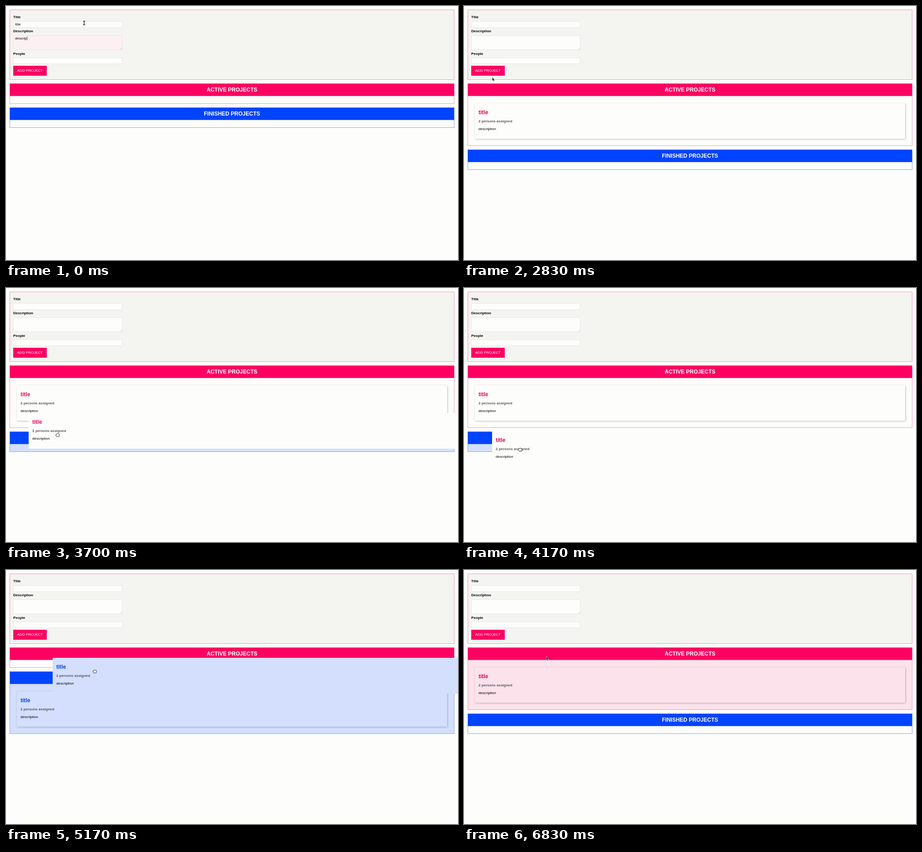
An HTML page for the animation above (7010 ms loop, 998 by 561 pixels).

```html
<!DOCTYPE html>
<html lang="en">
<head>
<meta charset="utf-8">
<title>Project board</title>
<style>
  html, body { margin: 0; width: 100%; height: 100%; overflow: hidden; background: #fdfdfb; }
  body { position: relative; font: 8px/10px "Liberation Sans", Arial, sans-serif; color: #000; }
  div, h2, h3, p, svg { position: absolute; margin: 0; white-space: pre; }

  .form { left: 8px; top: 8px; width: 982px; height: 155px; background: #f4f4f0; box-shadow: inset 0 0 0 1px #f59abf; }
  .label { left: 8px; font-weight: bold; }
  .field { left: 8px; width: 241px; height: 14px; background: #fdfdfb; box-shadow: inset 0 0 0 1px #e9e9e6; }
  .field.focus { background: #fdf0f3; }
  .field span { position: absolute; left: 4px; top: 2px; }
  .caret { display: inline-block; width: 1px; height: 9px; margin-right: -1px; background: #555; vertical-align: -2px; }
  .button { left: 8px; top: 124px; width: 74px; height: 22px; line-height: 22px; text-align: center; color: #fff; background: #ff0062; }

  .list { left: 8px; width: 982px; height: 45px; box-shadow: inset 0 0 0 1px var(--line); }
  .list.full { height: 138px; }
  .list.over { background: var(--tint); }
  .head { left: 0; width: 982px; height: 28px; font: bold 12px/28px "Liberation Sans", Arial, sans-serif; text-align: center; color: #fff; background: var(--main); box-shadow: inset 0 0 0 1px var(--rim); }
  .active { --main: #ff0062; --rim: #fb4088; --line: #f59abf; --tint: #fce2eb; --title: #e0075f; }
  .finished { --main: #0044ff; --rim: #4073fa; --line: #86a5f5; --tint: #d3dffc; --title: #0a44e0; }
  #active { top: 171px; }
  #finished { top: 224px; }
  #active.full + #finished { top: 317px; }

  .card { left: 16px; top: 44px; width: 950px; height: 78px; box-shadow: .5px .5px 4px rgba(0, 0, 0, .26); }
  .list:not(.full) .card { display: none; }
  .card h2 { left: 8px; top: 14px; font-size: 12px; line-height: 13px; color: var(--title); }
  .card h3 { left: 8px; top: 34px; font-size: 8px; line-height: 12px; color: #575757; }
  .card p { left: 8px; top: 51px; line-height: 12px; }

  #drag { left: 24px; height: 79px; box-shadow: none; }
  #drag.active { top: 215px; background: #fdfdfb; }
  #drag.finished { top: 268px; background: #d3dffc; }
  #trail { left: 0; top: 0; width: 991px; height: 561px; background: #f4f4f0; }
  #pointer { left: 0; top: 0; overflow: visible; }
</style>
</head>
<body>
<div class="form">
  <div class="label" style="top:12px">Title</div>
  <div class="field" id="title" style="top:26px"></div>
  <div class="label" style="top:43px">Description</div>
  <div class="field" id="about" style="top:57px;height:32px"></div>
  <svg style="left:244px;top:84px" width="5" height="5"><path d="M0 4.5 4.5 0M2.5 4.5 4.5 2.5" stroke="#aaa" stroke-width=".5"/></svg>
  <div class="label" style="top:93px">People</div>
  <div class="field" id="people" style="top:106px"></div>
  <svg id="spinner" style="left:239px;top:109px" width="5" height="8"><path d="M.3 3 2.5.6 4.7 3ZM.3 5 2.5 7.4 4.7 5Z" fill="#444"/></svg>
  <div class="button">ADD PROJECT</div>
</div>

<div class="list active" id="active"><div class="head">ACTIVE PROJECTS</div><div class="card"></div></div>
<div class="list finished" id="finished"><div class="head">FINISHED PROJECTS</div><div class="card"></div></div>

<div id="trail"></div>
<div class="card" id="drag"></div>

<svg id="pointer" width="1" height="1">
  <path id="beam" d="M-2.5-4.2H-.6L0-3.7.6-4.2H2.5M0-3.7V3.7M-2.5 4.2H-.6L0 3.7.6 4.2H2.5" fill="none" stroke="#222" stroke-width="1.3"/>
  <path id="arrow" d="M-2-5V3.6L-.1 1.9 1.2 4.8 2.6 4.2 1.3 1.3H3.6Z" fill="#222" stroke="#fff" stroke-width=".6"/>
  <path id="hand" d="M-2.6 3.4C-3.2 2-4.6 1.2-4.3-.2-4.1-1-3.3-.9-2.8-.6-3.1-3-1.6-3.4-1-2.6-.5-3.6.8-3.4 1-2.6 1.7-3.2 2.7-2.8 2.7-1.9 3.6-2.2 4.2-1.6 4.1-.6 4 1.2 3.2 2 3 3.4Z" fill="#fff" stroke="#222" stroke-width="1"/>
</svg>

<script>
const LOOP = 7010;
const $ = id => document.getElementById(id);
const ui = {};
for (const id of ["title", "about", "people", "spinner", "active", "finished", "trail", "drag", "pointer", "beam", "arrow", "hand"]) ui[id] = $(id);

for (const card of document.querySelectorAll(".card"))
  card.innerHTML = "<h2>title</h2><h3>2 persons assigned</h3><p>description</p>";

// Pointer path: time, x, y
const path = [
  [1850, 172.5, 37.5], [2460, 60, 143], [2760, 60, 143], [3180, 86, 256],
  [3300, 86, 256], [3570, 106, 298], [3860, 124, 357], [4330, 124, 357],
  [4650, 117, 298], [4770, 117, 298], [5110, 196, 224], [5190, 196, 224],
  [5380, 192, 197], [5500, 192, 197], [5800, 184, 197], [6650, 184, 197],
  [6830, 183.5, 196]
];
const shapes = [[0, "beam"], [2380, "arrow"], [3250, "hand"], [4330, "arrow"], [4740, "hand"], [6000, "arrow"]];
const keys = [0, 300, 430, 570, 710];
const TAB = 900, DIGIT = 1350, SUBMIT = 2700;
const LAG = 40;
const drags = [
  { from: 3300, to: 4330, kind: "active" },
  { from: 4770, to: 6000, kind: "finished" }
];

const within = (t, a, b) => t >= a && t < b;
const show = (el, on) => { el.style.display = on ? "" : "none"; };

function pointAt(t) {
  const i = path.findIndex(p => p[0] > t);
  if (i === 0) return path[0].slice(1);
  if (i < 0) return path[path.length - 1].slice(1);
  const [t0, x0, y0] = path[i - 1], [t1, x1, y1] = path[i];
  const k = (t - t0) / (t1 - t0);
  return [x0 + (x1 - x0) * k, y0 + (y1 - y0) * k];
}

function setField(el, text, focus, caret) {
  const html = `<span>${text}${focus && caret ? '<i class="caret"></i>' : ""}</span>`;
  if (el.innerHTML !== html) el.innerHTML = html;
  el.classList.toggle("focus", focus);
}

function drawForm(t) {
  const open = t < SUBMIT;
  const last = [...keys, TAB, DIGIT].filter(k => k <= t).pop();
  const caret = (t - last) % 1000 < 500;
  const typed = keys.filter(k => k <= t).length - 1;
  const inPeople = within(t, TAB, SUBMIT);
  setField(ui.title, open ? "title" : "", false, false);
  setField(ui.about, open ? "description".slice(0, 7 + typed) : "", t < TAB, caret);
  setField(ui.people, within(t, DIGIT, SUBMIT) ? "2" : "", inPeople, caret);
  show(ui.spinner, inPeople);
}

function drawLists(t) {
  ui.active.classList.toggle("full", within(t, SUBMIT, 4360) || t >= 6050);
  ui.finished.classList.toggle("full", within(t, 4360, 6050));
  ui.finished.classList.toggle("over", within(t, 3670, 5230));
  ui.active.classList.toggle("over", t >= 5260);
}

function drawDrag(t) {
  const drag = drags.find(d => within(t, d.from, d.to));
  const smear = within(t, 3300, 3700);
  show(ui.trail, smear);
  show(ui.drag, drag && !smear);
  if (!drag) return;
  const [x0, y0] = pointAt(drag.from);
  const [x, y] = pointAt(Math.max(drag.from, t - LAG));
  const dx = Math.round(x - x0), dy = Math.round(y - y0);
  if (smear) {
    const l = 23, r = 974, top = 211, b = 292;
    const hull = [[l, top], [r, top], [r + dx, top + dy], [r + dx, b + dy], [l + dx, b + dy], [l, b]];
    ui.trail.style.clipPath = `polygon(${hull.map(p => `${p[0]}px ${p[1]}px`).join()})`;
  } else {
    ui.drag.className = "card " + drag.kind;
    ui.drag.style.transform = `translate(${dx}px, ${dy}px)`;
  }
}

function drawPointer(t) {
  const [x, y] = pointAt(t);
  const shape = shapes.filter(s => s[0] <= t).pop()[1];
  ui.pointer.style.transform = `translate(${x}px, ${y}px)`;
  for (const id of ["beam", "arrow", "hand"]) show(ui[id], id === shape);
}

function frame() {
  const t = performance.now() % LOOP;
  drawForm(t);
  drawLists(t);
  drawDrag(t);
  drawPointer(t);
  requestAnimationFrame(frame);
}
frame();
</script>
</body>
</html>
```
